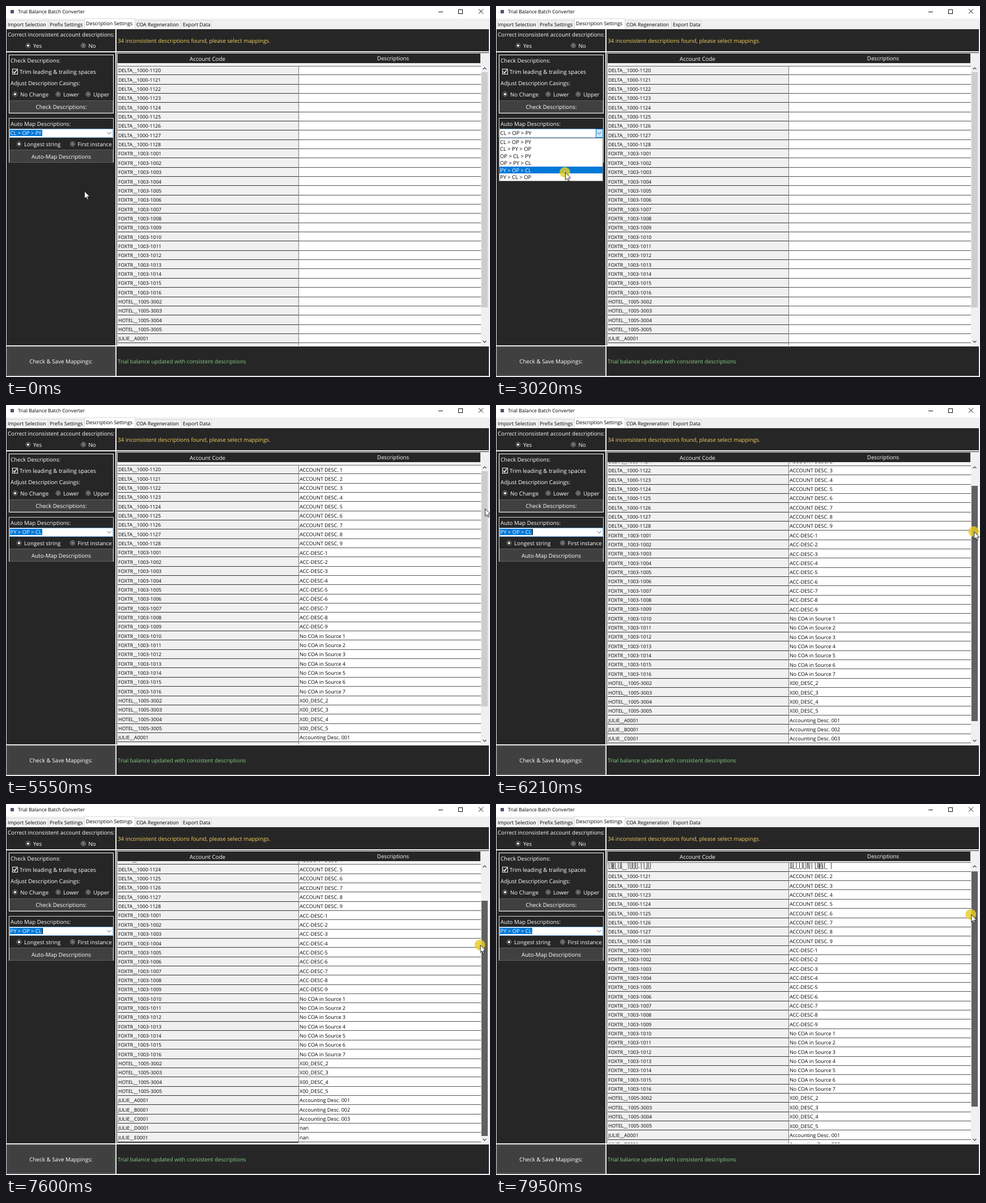
Write an HTML page with a canvas that moves like this. It is 854 px wide and 656 px high and loops after 8000 ms.

```html
<!DOCTYPE html>
<html lang="en">
<head>
<meta charset="utf-8">
<title>Trial Balance Batch Converter</title>
<style>
html, body { margin: 0; width: 100%; height: 100%; overflow: hidden; background: #fff; }
canvas { display: block; }
</style>
</head>
<body>
<canvas id="stage" width="854" height="656"></canvas>
<script>
const canvas = document.getElementById('stage');
const ctx = canvas.getContext('2d');
ctx.textRendering = 'geometricPrecision';

const LOOP = 8000;
const DARK = '#262626', BUTTON = '#404040', BLUE = '#0078d7', PALE = '#f0f0f0', INK = '#000';
const OPEN = 1780, PICK = 3400, PRESS = 4240, FILL = 4290, RELEASE = 4370, GRAB = 5950;
const ROW = 16.34, ITEM = 12.45, THUMB_TOP = 117, THUMB_MAX = 171, THUMB_LEN = 416;
const options = ['CL > OP > PY', 'CL > PY > OP', 'OP > CL > PY', 'OP > PY > CL', 'PY > OP > CL', 'PY > CL > OP'];
const arrow = new Path2D('M0 0V13L3 10.3L5 14.8L7 14L5.1 9.7L9 9.3Z');

// pointer hops, each eased from where the last one ended
const hops = [
  { from: 700, to: 1440, x: 183, y: 223 },
  { from: 1990, to: 2700, x: 122, y: 294 },
  { from: 3400, to: 4080, x: 119, y: 269 },
  { from: 4540, to: 5340, x: 828, y: 203, sag: 45 },
  { from: 5390, to: 5550, x: 845, y: 183 },
  { from: 5830, to: 6510, x: 842, y: 252 },
  { from: 6510, to: 7030, x: 836, y: 268 },
  { from: 7320, to: 8500, x: 840, y: 136 }
];

const rows = [];
const series = (n, code, text) => {
  for (let i = 0; i < n; i++) rows.push([code(i), text(i)]);
};
series(9, i => `DELTA__1000-${1120 + i}`, i => `ACCOUNT DESC. ${i + 1}`);
series(16, i => `FOXTR__1003-${1001 + i}`, i => i < 9 ? `ACC-DESC-${i + 1}` : `No COA in Source ${i - 8}`);
series(4, i => `HOTEL__1005-${3002 + i}`, i => `X00_DESC_${i + 2}`);
series(5, i => `JULIE__${'ABCDE'[i]}0001`, i => i < 3 ? `Accounting Desc. 00${i + 1}` : 'nan');

const clamp = (v, lo, hi) => Math.max(lo, Math.min(hi, v));

function pointer(t) {
  let x = 138, y = 327;
  for (const hop of hops) {
    const u = clamp((t - hop.from) / (hop.to - hop.from), 0, 1);
    const s = u * u * (3 - 2 * u);
    x += (hop.x - x) * s;
    y += (hop.y - y) * s + (hop.sag || 0) * Math.sin(Math.PI * u);
  }
  return [x, y];
}

function caretOn(t) {
  return t < PICK ? Math.floor((t + 175) / 595) % 2 === 1 : Math.floor((t - PICK) / 605) % 2 === 0;
}

function box(x, y, w, h, fill, line) {
  if (fill) {
    ctx.fillStyle = fill;
    ctx.fillRect(x, y, w, h);
  }
  if (line) {
    ctx.strokeStyle = line;
    ctx.lineWidth = 1;
    ctx.strokeRect(x + .5, y + .5, w - 1, h - 1);
  }
}

function text(str, x, mid, size = 9.75, color = '#fff', align = 'left') {
  ctx.font = `${size}px "Open Sans", "Noto Sans", sans-serif`;
  ctx.textAlign = align;
  ctx.fillStyle = color;
  ctx.fillText(str, x, mid + size * .36);
}

function line(color, width, d) {
  ctx.strokeStyle = color;
  ctx.lineWidth = width;
  ctx.stroke(new Path2D(d));
}

function disc(x, y, r, color) {
  ctx.fillStyle = color;
  ctx.beginPath();
  ctx.arc(x, y, r, 0, 7);
  ctx.fill();
}

function radio(x, y, label, on) {
  disc(x, y, 4.4, '#8c8c8c');
  disc(x, y, 3.5, on ? DARK : '#4a4a4a');
  disc(x, y, 2.1, on ? '#fff' : '#808080');
  text(label, x + 9, y);
}

function button(x, y, w, h, label, pressed) {
  box(x, y, w, h, pressed ? '#f7f0f4' : BUTTON, pressed ? '#fff' : '#5e5e5e');
  text(label, x + w / 2, y + h / 2 + (pressed ? 1.5 : .5), 9.85, pressed ? INK : '#fff', 'center');
}

function chrome() {
  box(0, 0, 854, 656, '#fff');
  box(8, 7, 6, 6, '#4a5470');
  text('Trial Balance Batch Converter', 21, 10, 8.65, INK);
  line('#111', 1, 'M763 10.5h8M834 5.5l8 8m0 -8l-8 8');
  box(798, 6, 8, 8, null, '#111');

  box(0, 22, 854, 19, PALE);
  const edges = [0, 74, 138, 227, 309, 362];
  const tabs = ['Import Selection', 'Prefix Settings', 'Description Settings', 'COA Regeneration', 'Export Data'];
  tabs.forEach((name, i) => {
    const on = i === 2, w = edges[i + 1] - edges[i];
    box(edges[i], on ? 22 : 25, w + 1, on ? 19 : 16, on ? '#fff' : PALE, '#dadada');
    text(name, edges[i] + 3, on ? 31 : 32.5, 8.83, INK);
  });

  // dark panels separated by light gaps
  box(0, 40, 854, 616, PALE);
  for (const [y, h] of [[41, 39], [82, 518], [602, 52]]) {
    box(1, y, 192, h, DARK);
    box(195, y, 657, h, DARK);
  }
  button(2, 603, 190, 50, 'Check & Save Mappings:');
  text('34 inconsistent descriptions found, please select mappings.', 197, 61, 9.75, '#f4d060');
  text('Trial balance updated with consistent descriptions', 197, 628.5, 9.72, '#86cc86');
}

function sidebar(t, x, y) {
  text('Correct inconsistent account descriptions:', 3, 51, 9.68);
  radio(39, 70, 'Yes', true);
  radio(136.5, 70, 'No');

  box(5, 86, 185, 104, null, '#fff');
  text('Check Descriptions:', 8, 96.5, 9.65);
  box(11, 111, 10, 10, DARK, '#fff');
  line('#fff', 1.4, 'M13 116l2 2.5l4 -5.5');
  text('Trim leading & trailing spaces', 24, 116.5, 9.9);
  text('Adjust Description Casings:', 8, 136.5);
  radio(16, 156, 'No Change', true);
  radio(92, 156, 'Lower');
  radio(145, 156, 'Upper');
  button(6, 167, 183, 22, 'Check Descriptions:');

  box(5, 198, 185, 79, null, '#d8d8d8');
  text('Auto Map Descriptions:', 8, 208.5);
  radio(23, 244, 'Longest string', true);
  radio(117.5, 244, 'First instance');
  button(6, 254, 183, 23, 'Auto-Map Descriptions', t >= PRESS && t < RELEASE);

  const open = t >= OPEN && t < PICK;
  box(6, 217, 183, 16, '#fff', '#7eb4ea');
  if (open || (x > 176 && x < 189 && y > 217 && y < 233))
    box(176, 217, 13, 16, open ? '#cce4f7' : '#e5f1fb', BLUE);
  line('#555', 1, 'M178.5 223l3.5 3.5l3.5 -3.5');
  if (!open) box(7, 219, 57, 11, BLUE);
  text(options[t < PICK ? 0 : 4], 7.5, 224.5, 9.4, open ? INK : '#fff');
  if (!open && caretOn(t)) box(64, 219, 1, 11, INK);

  if (open) {
    box(5, 233, 184, 77, '#fff', '#777');
    const hot = clamp(Math.floor((y - 233.7) / ITEM), 0, 5);
    options.forEach((name, i) => {
      const top = 234 + i * ITEM;
      if (i === hot) box(6, Math.round(top), 182, 12, BLUE);
      text(name, 7, top + 6.5, 9.4, i === hot ? '#fff' : INK);
    });
  }
}

function table(t) {
  // the view trails the pointer slightly while dragging
  const dragY = pointer(t - 15)[1] - 78.5;
  const thumb = t < GRAB ? THUMB_TOP : clamp(dragY, THUMB_TOP, THUMB_MAX);
  const shift = 1.185 * (thumb - THUMB_TOP);

  box(196, 83, 656, 517, PALE);
  box(197, 84, 640, 17, DARK);
  text('Account Code', 355.5, 93, 9.75, '#fff', 'center');
  text('Descriptions', 683, 93, 9.7, '#fff', 'center');

  ctx.save();
  ctx.beginPath();
  ctx.rect(197, 102, 641, 498);
  ctx.clip();
  box(197, 102, 641, 498, '#f8f1f5');
  rows.forEach(([code, desc], i) => {
    const mid = 114 + i * ROW - shift;
    const top = Math.round(mid - 8), bottom = Math.round(mid + ROW - 8);
    box(197, top, 319, bottom - top, PALE);
    box(517, top, 321, bottom - top, '#fff');
    if (!i) box(197, top, 641, 1, '#666');
    box(197, bottom - 1, 319, 2, '#303030');
    box(517, bottom - 1, 321, 1, '#555');
    box(516, top, 1, bottom - top, '#777');
    text(code, 198, mid + .3, 8.67, INK);
    if (t >= FILL) text(desc, 518, mid + .3, 8.97, INK);
  });
  // redraw smear of the first row on the way back up
  if (t > hops.at(-1).from && shift > 0 && shift < 9) {
    const y = Math.round(114 - shift);
    ctx.drawImage(canvas, 197, y, 641, 1, 197, 104, 641, y - 101);
  }
  ctx.restore();

  box(838, 102, 13, 498, PALE);
  box(839, thumb, 11, THUMB_LEN, t < GRAB ? '#cdcdcd' : '#606060');
  line('#444', 1.2, 'M841.5 112l3 -3l3 3M841.5 592l3 3l3 -3');
}

function drawPointer(t, x, y) {
  const during = (a, b) => t >= a && t < b;
  if (during(OPEN, 1990) || during(3020, PICK) || during(FILL, 4540) || t >= GRAB)
    disc(x - .5, y, 9.3, 'rgba(232,206,36,.82)');
  ctx.save();
  ctx.translate(x + .5, y + .5);
  ctx.fillStyle = '#fff';
  ctx.fill(arrow);
  ctx.strokeStyle = '#111';
  ctx.lineWidth = .9;
  ctx.stroke(arrow);
  ctx.restore();
}

function draw(t) {
  const [x, y] = pointer(t);
  chrome();
  table(t);
  sidebar(t, x, y);
  drawPointer(t, x, y);
}

const start = performance.now();
function tick() {
  draw((performance.now() - start) % LOOP);
  requestAnimationFrame(tick);
}
tick();
</script>
</body>
</html>
```
